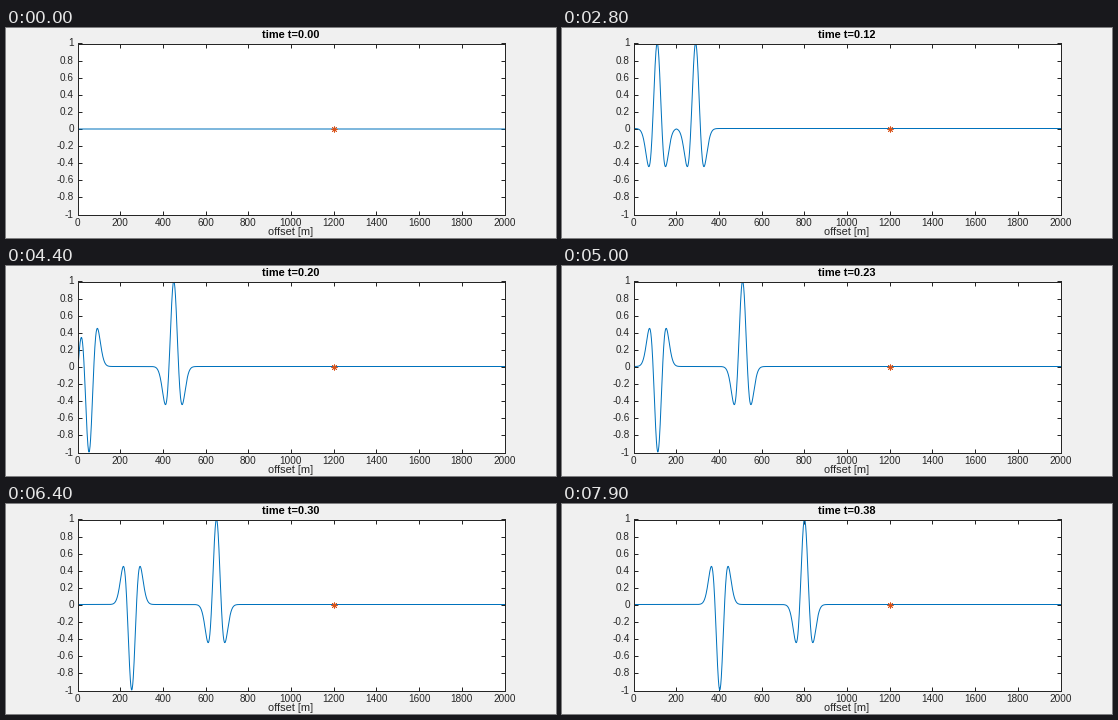
Animation of 550 by 210 pixels, one loop 8000 ms. Source, as a matplotlib script:

```python
import numpy as np
import matplotlib.pyplot as plt
from matplotlib.animation import FuncAnimation

W, H, DPI = 550, 210, 100
PX = 72 / DPI                              # points per pixel
LEFT, RIGHT, TOP, BOTTOM = 71.5, 498.5, 15.5, 186.5
INK, BLUE, ORANGE = "#262626", "#0072bd", "#d95319"

SPEED, FREQ = 2000.0, 20.0                 # m/s, Hz
DELAY = 1.5 / FREQ
SOURCE, WALL = 201.0, 2.5                  # m
STEP, HOLD, FRAMES = 200, 4, 80            # steps per second, still frames

plt.rcParams["font.family"] = "Liberation Sans"
fig = plt.figure(figsize=(W / DPI, H / DPI), dpi=DPI, facecolor="#f0f0f0")
ax = fig.add_axes([LEFT / W, 1 - BOTTOM / H, (RIGHT - LEFT) / W, (BOTTOM - TOP) / H])
ax.set(xlim=(0, 2000), ylim=(-1, 1))
ax.set_xticks(np.arange(0, 2001, 200))
ax.set_yticks(np.linspace(-1, 1, 11))
ax.tick_params(direction="in", top=True, right=True, length=4.3 * PX, width=PX,
               color=INK, labelbottom=False, labelleft=False)
for spine in ax.spines.values():
    spine.set(linewidth=PX, edgecolor=INK)


def label(x, y, text, size, ha="center", **style):
    """Text with its baseline at pixel (x, y), counted from the top left."""
    return fig.text(x / W, 1 - y / H, text, fontsize=size * PX, ha=ha,
                    va="baseline", **style)


for v in range(0, 2001, 200):
    label(LEFT + v / 2000 * (RIGHT - LEFT), 198, str(v), 10, color=INK)
for i in range(-5, 6):
    label(68, (TOP + BOTTOM) / 2 - i / 5 * (BOTTOM - TOP) / 2 + 3, f"{i / 5:g}", 10,
          ha="right", color=INK)
label(285, 207, "offset [m]", 11, color=INK)
title = label(284.5, 10, "", 11, color="black", weight="bold")

x = np.linspace(0, 2000, 1601)
wave, = ax.plot(x, 0 * x, color=BLUE, lw=PX, snap=False)
ax.plot([1200], [0], marker=(8, 2, 0), ms=6 * PX, mew=0.8 * PX, color=ORANGE, zorder=4)


def ricker(t):
    a = (np.pi * FREQ * t) ** 2
    return (1 - 2 * a) * np.exp(-a)


def field(t):
    """Waves leaving the source, with an inverted echo from the left wall."""
    direct = ricker(t - DELAY - np.abs(x - SOURCE) / SPEED)
    echo = ricker(t - DELAY - (x + SOURCE - 2 * WALL) / SPEED)
    return np.where(x > WALL, direct - echo, 0)


def draw(frame):
    k = max(0, frame - HOLD)
    t = k / STEP
    # half a pixel up puts the moving curve's rest line on one pixel row
    lift = 1 / (BOTTOM - TOP) if k else 0
    wave.set_ydata(field(t) + lift if k else 0 * x)
    title.set_text(f"time t={t:.2f}")
    return wave, title


anim = FuncAnimation(fig, draw, frames=FRAMES, interval=100, init_func=lambda: draw(0),
                     repeat=True, repeat_delay=0, blit=False)
plt.show()
```
